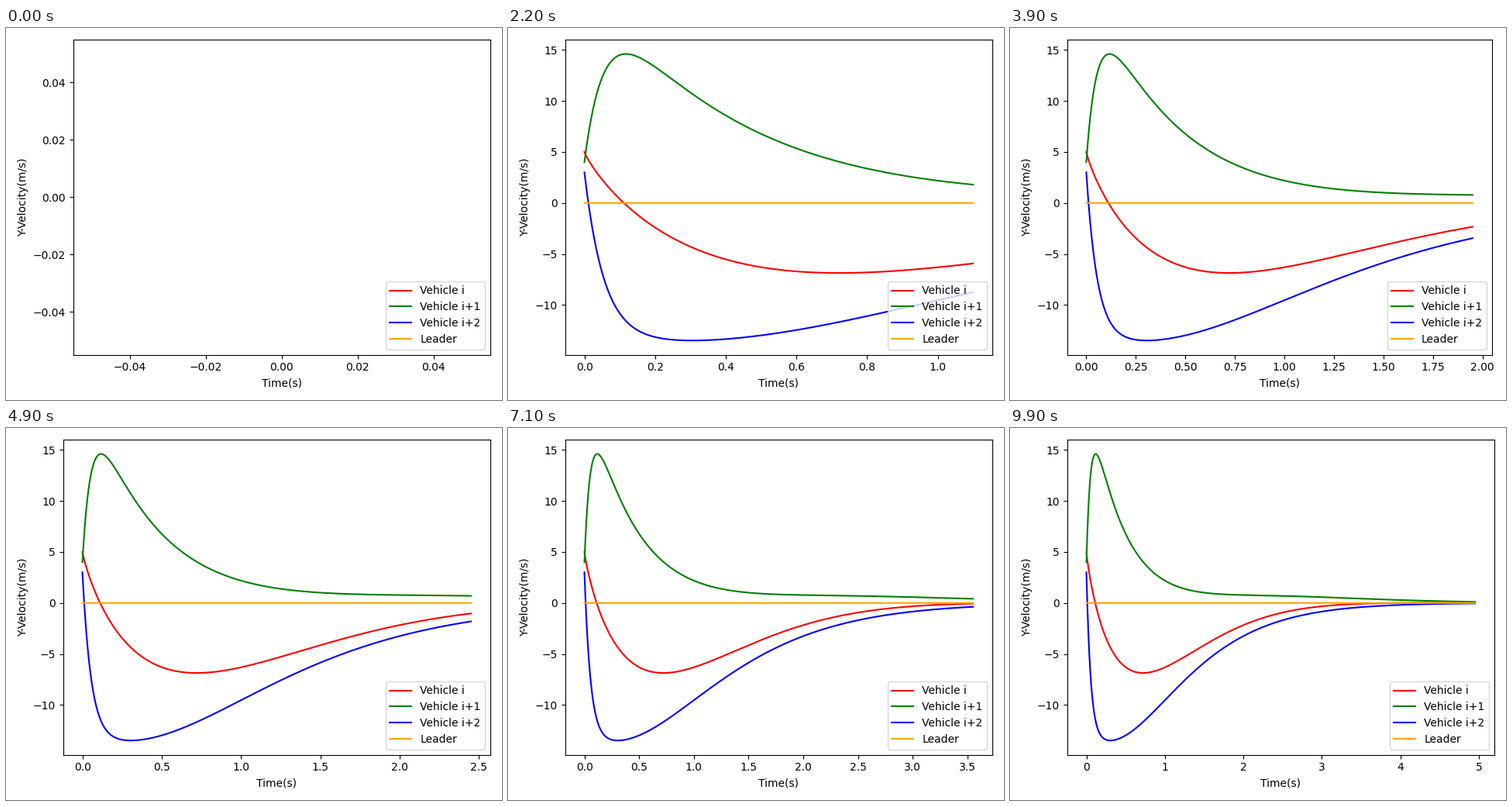
Animation of 640 by 480 pixels, one loop 10000 ms. Source, as a matplotlib script:

```python
import numpy as np
import matplotlib.pyplot as plt
from matplotlib.animation import FuncAnimation

FRAMES = 100
STEP = 0.05   # seconds of data revealed per frame
DT = 0.0005


def decay(rate):
    return np.exp(-rate * time)


def bump(peak, power):
    """Rise and fall with height 1 at t = peak; higher powers are narrower."""
    u = time / peak
    return (u * np.exp(1 - u)) ** power


time = np.arange(0, FRAMES * STEP, DT)
base = decay(2.39)

curves = [
    ("Vehicle i", "red",
     5 * base - 7.96 * bump(0.61, 0.83) + 1.04 * bump(2.25, 5)),
    ("Vehicle i+1", "green",
     22.35 * base - 18.35 * decay(17.8) + 0.638 * bump(2.4, 5.2)),
    ("Vehicle i+2", "blue",
     17 * decay(18.4) - 14 * base - 9.2 * bump(0.675, 1.23)),
    ("Leader", "orange", 0 * time),
]

fig, ax = plt.subplots(figsize=(6.4, 4.8), dpi=100)


def draw(i):
    n = round(i * STEP / DT)
    ax.clear()
    for name, color, v in curves:
        ax.plot(time[:n], v[:n], color=color, label=name)
    ax.set_xlabel("Time(s)")
    ax.set_ylabel("Y-Velocity(m/s)")
    ax.legend(loc="lower right")
    fig.tight_layout()
    return ax.lines


anim = FuncAnimation(fig, draw, frames=FRAMES, interval=100, repeat=True)
plt.show()
```
